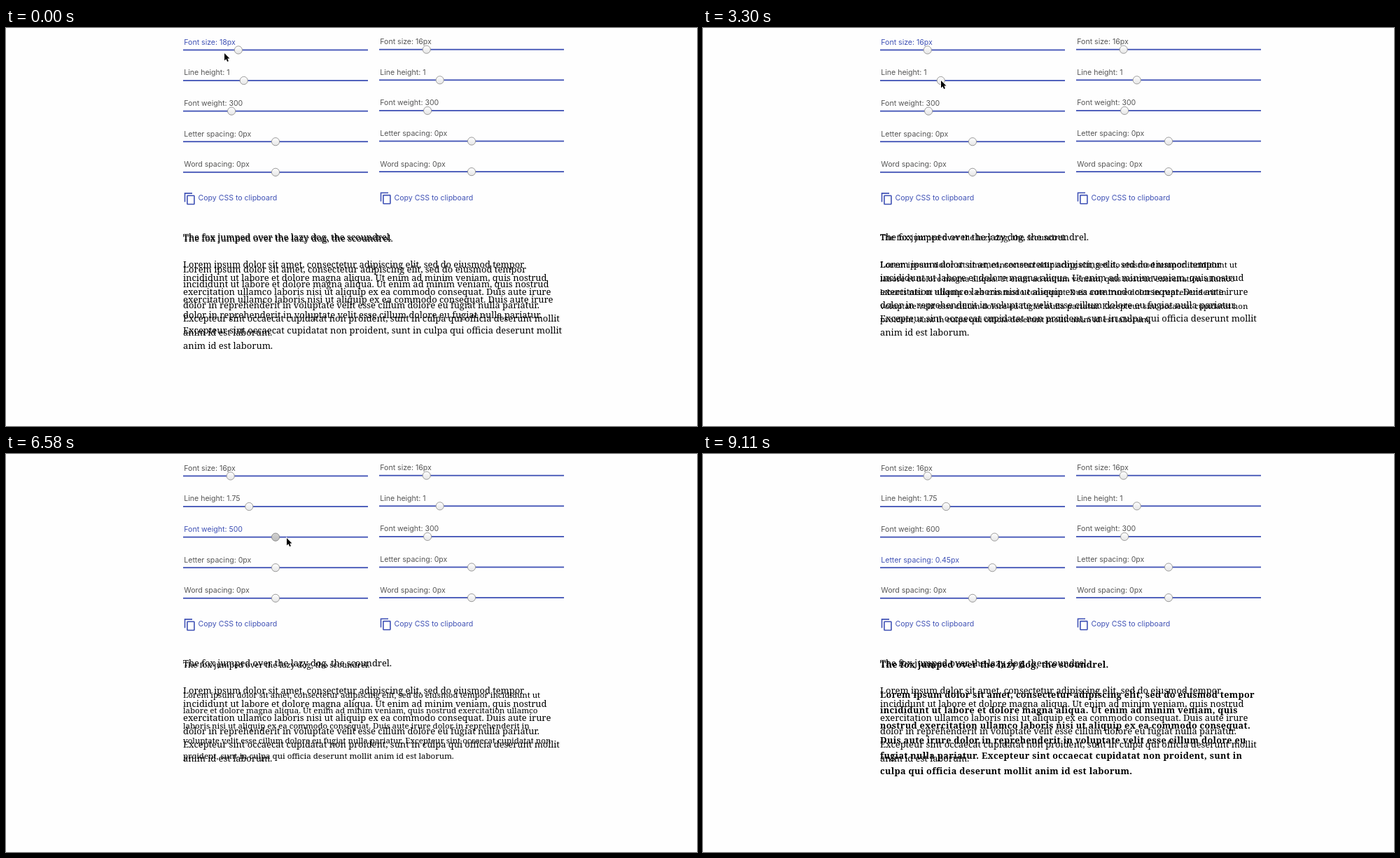
An HTML page with a canvas that plays this animation: 987 px wide and 568 px high, repeating every 9.86 s.

```html
<!DOCTYPE html>
<html lang="en">
<head>
<meta charset="utf-8">
<title>Font style matcher</title>
<style>
html, body { margin: 0; width: 100%; height: 100%; overflow: hidden; background: #fefefe; }
canvas { display: block; }
</style>
</head>
<body>
<canvas id="stage" width="987" height="568"></canvas>
<script>
const ctx = document.getElementById('stage').getContext('2d');
const LOOP = 9860, TICK = 149.34;   // ms
const BLUE = '#3f51b5', GREY = '#555';
const SCALE = 0.778;                // css px to stage px
const LEFT = 253, WIDTH = 264, GAP = 280, WRAP = 546.5;
const INSET = 6.2;                  // thumb centre at a slider's minimum
const SERIF = '"Noto Serif", serif';
const UI_FONT = '10.55px Inter, sans-serif';

const TITLE = 'The fox jumped over the lazy dog, the scoundrel.';
const BODY = 'Lorem ipsum dolor sit amet, consectetur adipiscing elit, sed do eiusmod tempor ' +
  'incididunt ut labore et dolore magna aliqua. Ut enim ad minim veniam, quis nostrud ' +
  'exercitation ullamco laboris nisi ut aliquip ex ea commodo consequat. Duis aute irure ' +
  'dolor in reprehenderit in voluptate velit esse cillum dolore eu fugiat nulla pariatur. ' +
  'Excepteur sint occaecat cupidatat non proident, sunt in culpa qui officia deserunt mollit ' +
  'anim id est laborum.';

const BASE = { size: 16, height: 1.6, weight: 300, letter: 0, word: 0, focus: '', down: false };

const SLIDERS = {
  size: { min: 5, max: 50, step: 1, label: v => `Font size: ${v}px` },
  height: { min: 0, max: 5, step: 0.05, label: v => `Line height: ${v === 1.6 ? 1 : v}` },
  weight: { min: 100, max: 900, step: 100, label: v => `Font weight: ${v}` },
  letter: { min: -2, max: 2, step: 0.05, label: v => `Letter spacing: ${v}px` },
  word: { min: -2, max: 2, step: 0.05, label: v => `Word spacing: ${v}px` }
};

// pointer key points: tick, x, y
const PATH = [
  [0, 312, 36], [3, 327, 35], [6, 327, 35], [9, 341, 35], [13, 321, 35],
  [14, 319, 35], [16, 319, 35], [17, 316, 35], [18, 316, 35], [22, 340, 75],
  [24, 339, 75], [29, 355, 75], [33, 347, 75], [35, 347, 75], [39, 322.5, 119],
  [44, 401, 120], [45, 405, 120], [47, 405, 120], [50, 395, 137], [53, 386, 163],
  [56, 414.3, 163], [58, 414.3, 163], [60, 805, 544], [61, 1000, 600]
];

// each slider is held from press to release; its value follows the pointer
const DRAGS = [
  { key: 'size', press: 5, release: 18 },
  { key: 'height', press: 24, release: 36 },
  { key: 'weight', press: 39, release: 48 },
  { key: 'letter', press: 53, release: 59 }
];

const ease = p => p * p * (3 - 2 * p);

function pointerAt(tick) {
  const i = PATH.findIndex(point => point[0] > tick);
  if (i < 0) return PATH[PATH.length - 1].slice(1);
  const [t0, x0, y0] = PATH[i - 1], [t1, x1, y1] = PATH[i];
  const p = ease((tick - t0) / (t1 - t0));
  return [x0 + (x1 - x0) * p, y0 + (y1 - y0) * p];
}

const pxPerUnit = ({ min, max }) => (WIDTH - 2 * INSET) / (max - min);

function dragged(value, key, press, tick) {
  const slider = SLIDERS[key];
  const shift = (pointerAt(tick)[0] - pointerAt(press)[0]) / pxPerUnit(slider);
  return +(Math.round((value + shift) / slider.step) * slider.step).toFixed(2);
}

function stateAt(tick) {
  const s = { ...BASE, size: 18, focus: 'size' };
  for (const { key, press, release } of DRAGS) {
    if (tick < press) break;
    s[key] = dragged(s[key], key, press, Math.min(tick, release - 1));
    s.focus = key;
    s.down = tick < release;
  }
  return s;
}

function text(str, x, y, font, color, spacing = 0) {
  ctx.font = font;
  ctx.letterSpacing = spacing + 'px';
  ctx.fillStyle = color;
  ctx.fillText(str, x, y);
}

function wrap(str) {
  const lines = [];
  let line = '';
  for (const word of str.split(' ')) {
    const next = line ? line + ' ' + word : word;
    if (line && ctx.measureText(next).width > WRAP) {
      lines.push(line);
      line = word;
    } else line = next;
  }
  return [...lines, line];
}

function sample(s, top, ratio) {
  const px = s.size * SCALE;
  const pitch = Math.floor(s.size * s.height + 1e-6) * SCALE;
  const font = `${s.weight >= 600 ? 700 : 400} ${px * ratio}px ${SERIF}`;
  const spacing = s.letter * SCALE;
  ctx.font = font;
  ctx.letterSpacing = spacing + 'px';
  [TITLE, '', ...wrap(BODY)].forEach((line, i) =>
    text(line, LEFT, top + pitch * (i + 0.5) + px * 0.35, font, '#000', spacing));
}

function thumb(x, y, held) {
  const fill = ctx.createLinearGradient(0, y - 6, 0, y + 6);
  fill.addColorStop(0, held ? '#d2d2d2' : '#ffffff');
  fill.addColorStop(1, held ? '#bcbcbc' : '#e4e4e4');
  ctx.beginPath();
  ctx.arc(x, y, 5.6, 0, Math.PI * 2);
  ctx.fillStyle = fill;
  ctx.fill();
  ctx.strokeStyle = held ? '#858585' : '#929292';
  ctx.lineWidth = 0.9;
  ctx.stroke();
}

function copyIcon(x, y) {
  ctx.strokeStyle = BLUE;
  ctx.lineWidth = 1.6;
  ctx.beginPath();
  ctx.moveTo(x + 10.5, y);
  ctx.lineTo(x, y);
  ctx.lineTo(x, y + 12.3);
  ctx.stroke();
  ctx.beginPath();
  ctx.roundRect(x + 3.4, y + 3.4, 10, 12.2, 0.6);
  ctx.stroke();
}

function panel(s, x, y) {
  Object.entries(SLIDERS).forEach(([key, slider], i) => {
    const row = y + i * 43.6;
    const on = s.focus === key;
    text(slider.label(s[key]), x + 1.3, row - 7.6, UI_FONT, on ? BLUE : GREY);
    ctx.fillStyle = BLUE;
    ctx.fillRect(x, row - 0.9, WIDTH, 1.8);
    thumb(x + INSET + (s[key] - slider.min) * pxPerUnit(slider), row, on && s.down);
  });
  copyIcon(x + 2.5, y + 204.5);
  text('Copy CSS to clipboard', x + 21.5, y + 214.9, UI_FONT, BLUE);
}

function pointer(x, y) {
  const shape = [[0, 0], [0, 10.6], [2.4, 8.3], [4.1, 12.1], [5.9, 11.3], [4.3, 7.6], [7.5, 7.6]];
  ctx.beginPath();
  shape.forEach(([dx, dy]) => ctx.lineTo(x + dx, y + dy));
  ctx.closePath();
  ctx.strokeStyle = '#fff';
  ctx.lineWidth = 1.6;
  ctx.stroke();
  ctx.fillStyle = '#000';
  ctx.fill();
}

function draw(now) {
  const tick = Math.floor((now % LOOP) / TICK + 0.05);
  const s = stateAt(tick);
  ctx.fillStyle = '#fefefe';
  ctx.fillRect(0, 0, 987, 568);
  panel(s, LEFT, 31.4);
  panel(BASE, LEFT + GAP, 30.7);
  sample(s, 289.3, s.weight >= 600 ? 1.012 : 0.926);
  sample(BASE, 288.7, 1.036);
  pointer(...pointerAt(tick));
}

const start = performance.now();
function loop() {
  draw(performance.now() - start);
  requestAnimationFrame(loop);
}
loop();
</script>
</body>
</html>
```
